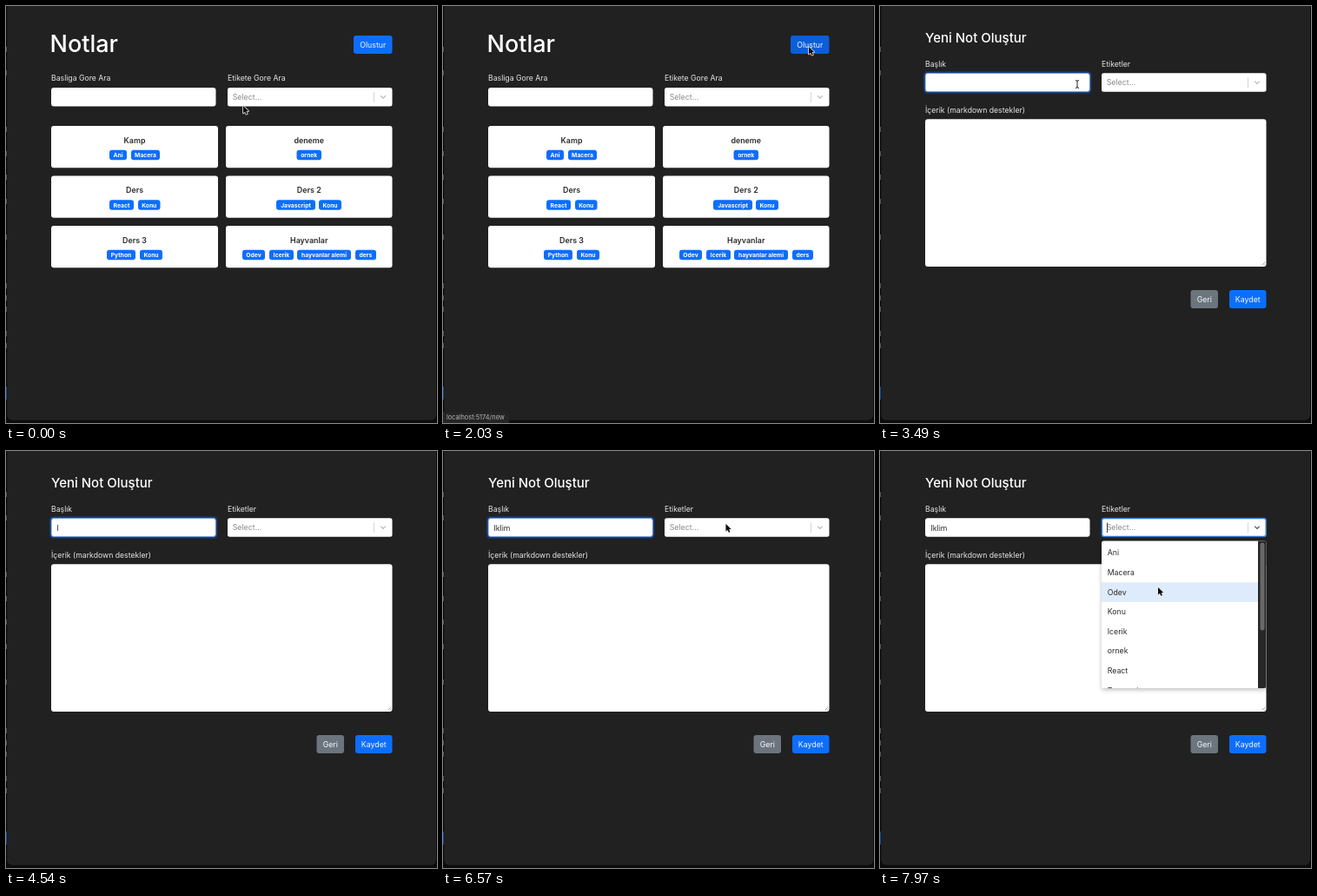
An HTML page with a canvas for the animation above (8 s loop, 496 px wide and 480 px high).

```html
<!DOCTYPE html>
<html lang="tr">
<head>
<meta charset="utf-8">
<title>Notlar</title>
<style>
html, body { margin: 0; width: 100%; height: 100%; overflow: hidden; background: #0b0b0b; }
canvas { display: block; width: 496px; height: 480px; }
</style>
</head>
<body>
<canvas id="stage"></canvas>
<script>
const W = 496, H = 480, LOOP = 8000;
const canvas = document.getElementById('stage');
const ctx = canvas.getContext('2d');
const dpr = window.devicePixelRatio || 1;
canvas.width = W * dpr;
canvas.height = H * dpr;
ctx.scale(dpr, dpr);

const BLUE = '#0d6efd', DARK = '#212121', INK = '#2b2b2b';

// Moments at which the interface changes, in ms
const HOVER = 1250, STATUS = 1600, OPEN = 2250, FOCUS = 3300, HIDE = 4260, SHOW = 6010,
      MENU = 7000, CARET = 7900;
const KEYS = [HIDE, 4960, 5170, 5450, 5660];
const TITLE = 'Iklim';
const OPTIONS = ['Ani', 'Macera', 'Odev', 'Konu', 'Icerik', 'ornek', 'React', 'Typescript'];

// Pointer stops: time, x, y of the tip
const PATH = [
  [0, 273, 115], [120, 273, 115], [1080, 422, 43.5], [1400, 422, 43.5], [1950, 421, 47],
  [2350, 421, 47], [3200, 227, 90], [6010, 227, 90], [6150, 310, 71], [6700, 328, 86],
  [7050, 329, 88], [7410, 332, 133.5], [7550, 332, 135], [7850, 320, 157], [8000, 320, 157]
];

// Card: title, x, y, width, then badges as [label, x, width]
const CARDS = [
  ['Kamp', 52, 138, 192, [['Ani', 119, 20], ['Macera', 144, 33]]],
  ['deneme', 253, 138, 191.5, [['ornek', 334.5, 28.5]]],
  ['Ders', 52, 195.5, 192, [['React', 119, 28], ['Konu', 152, 25.5]]],
  ['Ders 2', 253, 195.5, 191.5, [['Javascript', 311, 45], ['Konu', 360, 26]]],
  ['Ders 3', 52, 253, 192, [['Python', 116, 33], ['Konu', 154, 26]]],
  ['Hayvanlar', 253, 253, 191.5,
    [['Odev', 272, 26], ['Icerik', 303, 28], ['hayvanlar alemi', 335, 62], ['ders', 402, 24]]]
];

function box(x, y, w, h, r, fill) {
  ctx.beginPath();
  ctx.roundRect(x, y, w, h, r);
  ctx.fillStyle = fill;
  ctx.fill();
}

function outline(x, y, w, h, r, color, width) {
  ctx.beginPath();
  ctx.roundRect(x, y, w, h, r);
  ctx.strokeStyle = color;
  ctx.lineWidth = width;
  ctx.stroke();
}

function text(str, x, y, size, color, weight = 400, align = 'left') {
  ctx.font = `${weight} ${size}px Inter, "Liberation Sans", sans-serif`;
  ctx.textAlign = align;
  ctx.fillStyle = color;
  ctx.fillText(str, x, y);
}

const label = (str, x, y) => text(str, x, y, 8.7, '#e6e6e6');

function button(str, x, y, w, fill) {
  box(x, y, w, 21, 3, fill);
  text(str, x + w / 2, y + 13.7, 8.8, '#f4f7ff', 400, 'center');
}

function mix(a, b, k) {
  return `rgb(${a.map((v, i) => Math.round(v + (b[i] - v) * k))})`;
}

function pointerAt(t) {
  let i = 0;
  while (i < PATH.length - 2 && t >= PATH[i + 1][0]) i++;
  const [t0, x0, y0] = PATH[i], [t1, x1, y1] = PATH[i + 1];
  const p = Math.min(1, (t - t0) / (t1 - t0));
  const k = p * p * (3 - 2 * p);
  return [x0 + (x1 - x0) * k, y0 + (y1 - y0) * k];
}

function backdrop() {
  ctx.fillStyle = '#0b0b0b';
  ctx.fillRect(0, 0, W, H);
  ctx.fillStyle = '#555';
  for (const y of [50, 77, 142, 170, 197, 225, 266, 322, 336, 349, 377, 391]) ctx.fillRect(0, y - 3, 1, 6);
  ctx.fillStyle = '#0b4fa8';
  ctx.fillRect(0, 438, 1, 15);
  box(1.3, -10, 493.7, 486.7, 6, DARK);
}

function select(y, active) {
  box(255, y, 189.5, 21.5, 2.5, '#fff');
  if (active) outline(255.3, y + 0.3, 189, 21, 2.5, '#2f74d8', 1.5);
  text('Select...', 260.7, y + 14, 8.8, '#8a8a8a');
  ctx.fillStyle = '#ccc';
  ctx.fillRect(423, y + 5, 0.8, 12);
  ctx.beginPath();
  ctx.moveTo(431.2, y + 9.3);
  ctx.lineTo(434, y + 12.1);
  ctx.lineTo(436.8, y + 9.3);
  ctx.strokeStyle = active ? '#555' : '#bbb';
  ctx.lineWidth = 1.3;
  ctx.stroke();
}

function listPage(t) {
  text('Notlar', 50.5, 53, 27, '#fff', 500);
  const k = Math.max(0, Math.min(1, (t - HOVER) / 150));
  button('Olustur', 400, 34, 44.5, mix([13, 110, 253], [11, 94, 215], k));
  label('Basliga Gore Ara', 52, 86);
  label('Etikete Gore Ara', 255, 86);
  box(52, 94, 189.5, 21.5, 3, '#fff');
  select(94, false);
  for (const [name, x, y, w, badges] of CARDS) {
    box(x, y, w, 48.3, 3, '#fff');
    text(name, x + w / 2, y + 19.5, 8.9, INK, 600, 'center');
    for (const [tag, bx, bw] of badges) {
      box(bx, y + 27.8, bw, 11.4, 3, BLUE);
      text(tag, bx + bw / 2, y + 36, 6.75, '#fff', 700, 'center');
    }
  }
  if (t >= STATUS) {
    box(0, 467.5, 76, 13, [0, 3, 0, 0], '#252525');
    text('localhost:5174/new', 4, 476, 7.4, '#b5b5b5');
  }
}

function menu(t) {
  const step = 22.6, top = 106;
  const picked = t < 7480 ? 0 : t < 7790 ? 1 : 2;
  ctx.save();
  ctx.shadowColor = 'rgba(0,0,0,.25)';
  ctx.shadowBlur = 5;
  ctx.shadowOffsetY = 2;
  box(255, 103.5, 189.5, 169.5, 2.5, '#fff');
  ctx.restore();
  ctx.save();
  ctx.beginPath();
  ctx.roundRect(255, 103.5, 189.5, 169.5, 2.5);
  ctx.clip();
  ctx.fillStyle = '#deebfc';
  ctx.fillRect(255, top + picked * step, 180, step);
  OPTIONS.forEach((name, i) => text(name, 261.7, 120.3 + i * step, 8.75, INK));
  ctx.fillStyle = '#272727';
  ctx.fillRect(435, 103, 10, 171);
  box(437.5, 105.5, 5, 101, 2.5, '#696969');
  ctx.restore();
}

function formPage(t) {
  const open = t >= MENU;
  text('Yeni Not Oluştur', 52, 42, 15, '#fff', 500);
  label('Başlık', 52, 69.5);
  label('Etiketler', 255, 69.5);
  if (t >= FOCUS && !open) {
    box(50, 75.2, 193.5, 25.6, 4.5, '#183a73');
    box(52, 77.2, 189.5, 21.6, 3, '#fff');
    outline(52.2, 77.4, 189.1, 21.2, 3, '#5d8fdc', 0.8);
  } else {
    box(52, 77.2, 189.5, 21.6, 3, '#fff');
  }
  const typed = KEYS.filter(k => t >= k).length;
  text(TITLE.slice(0, typed), 58.5, 91.5, 8.7, INK);
  select(77.3, open);
  label('İçerik (markdown destekler)', 52, 122.7);
  box(52, 130.3, 392.5, 169.7, 3, '#fff');
  ctx.beginPath();
  ctx.moveTo(439.5, 298.5);
  ctx.lineTo(443.2, 294.8);
  ctx.moveTo(441.7, 298.7);
  ctx.lineTo(443.4, 297);
  ctx.strokeStyle = '#888';
  ctx.lineWidth = 0.7;
  ctx.stroke();
  button('Geri', 357.5, 327, 31.5, '#6c757d');
  button('Kaydet', 402, 327, 42.5, BLUE);
  if (open) menu(t);
  if (t >= CARET) {
    ctx.fillStyle = '#333';
    ctx.fillRect(261, 82.5, 0.9, 11.5);
  }
}

function arrow(x, y) {
  ctx.beginPath();
  ctx.moveTo(x, y);
  for (const [dx, dy] of [[0, 8.6], [2, 6.8], [3.4, 9.8], [4.9, 9.1], [3.6, 6.2], [6.2, 6.1]]) ctx.lineTo(x + dx, y + dy);
  ctx.closePath();
  ctx.lineJoin = 'round';
  ctx.strokeStyle = '#eee';
  ctx.lineWidth = 1.5;
  ctx.stroke();
  ctx.fillStyle = '#0c0c0c';
  ctx.fill();
}

function beam(x, y) {
  ctx.beginPath();
  ctx.moveTo(x - 2, y - 4.5);
  ctx.quadraticCurveTo(x, y - 4.5, x, y - 3);
  ctx.lineTo(x, y + 3);
  ctx.quadraticCurveTo(x, y + 4.5, x - 2, y + 4.5);
  ctx.moveTo(x + 2, y - 4.5);
  ctx.quadraticCurveTo(x, y - 4.5, x, y - 3);
  ctx.moveTo(x, y + 3);
  ctx.quadraticCurveTo(x, y + 4.5, x + 2, y + 4.5);
  ctx.strokeStyle = '#222';
  ctx.lineWidth = 1;
  ctx.stroke();
}

function pointer(t) {
  if (t >= HIDE && t < SHOW) return;
  const [x, y] = pointerAt(t);
  const inInput = t >= OPEN && x < 241 && y > 77 && y < 99;
  (inInput ? beam : arrow)(x, y);
}

function draw(t) {
  backdrop();
  if (t < OPEN) listPage(t);
  else formPage(t);
  pointer(t);
}

const start = performance.now();
function tick(now) {
  draw(Math.max(0, now - start) % LOOP);
  requestAnimationFrame(tick);
}
draw(0);
requestAnimationFrame(tick);
</script>
</body>
</html>
```
